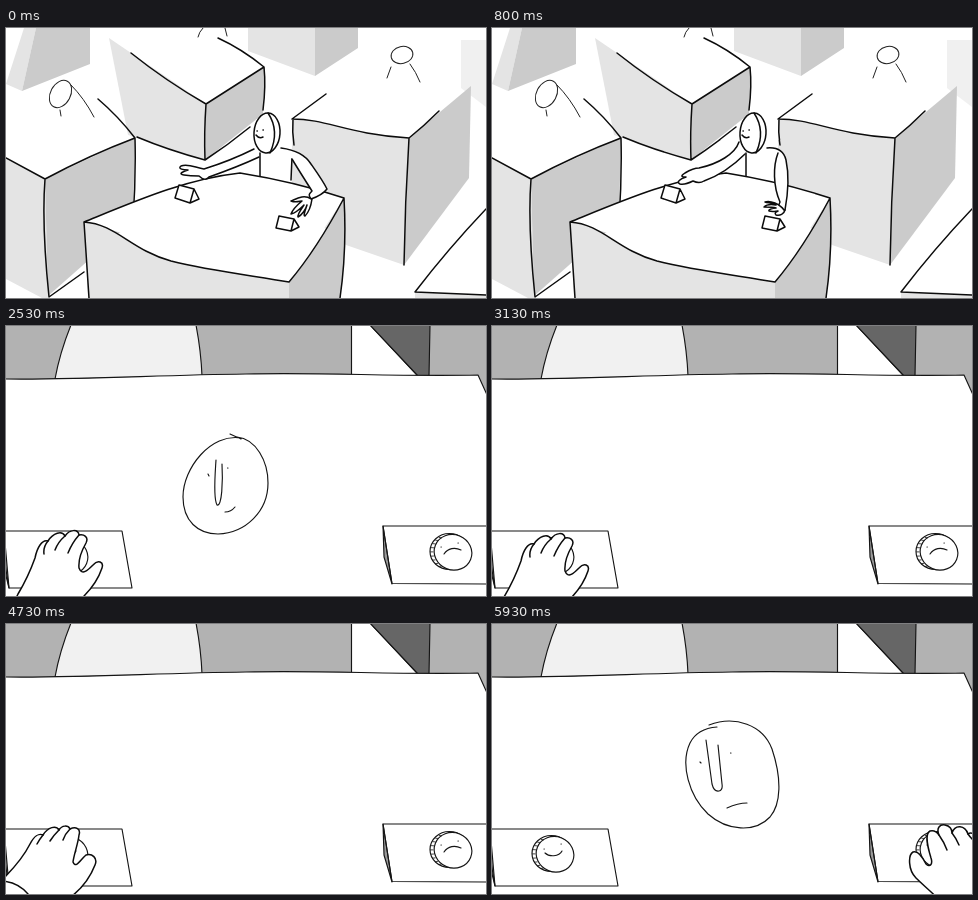
An HTML page for the animation above (5990 ms loop, 480 px wide and 270 px high).

```html
<!DOCTYPE html>
<html lang="en">
<head>
<meta charset="utf-8">
<title>Tables and coins</title>
<style>
html, body { margin: 0; width: 100%; height: 100%; overflow: hidden; background: #fff; }
svg { display: block; width: 100vw; height: 100vh; }
path { stroke-linecap: round; stroke-linejoin: round; }
.light { fill: #e4e4e4; }
.dark { fill: #cbcbcb; }
.ink { fill: none; stroke: #0c0c0c; stroke-width: 1.5; }
.thin { fill: none; stroke: #151515; stroke-width: 1.15; }
.fine { fill: none; stroke: #222; stroke-width: 1; }
.white { fill: #fff; }
</style>
</head>
<body>
<svg viewBox="0 0 480 270" preserveAspectRatio="none">
  <g id="wide">
    <path class="light" d="M18 0H30L16 63L0 56Z M242 0H309V48L242 23Z"/>
    <path class="dark" d="M30 0H84V36L16 63Z M309 0H352V20L309 48Z"/>
    <path fill="#f0f0f0" d="M455 12H480V79L455 60Z"/>

    <path class="light" d="M103 10L200 76L199 132L122 107Z"/>
    <path class="dark" d="M200 76L259 39L257 86L199 132Z"/>
    <path class="ink" d="M125 25Q160 53 200 76Q228 58 258 39Q236 21 212 10 M200 76Q198 105 199 132Q222 117 244 99 M258 39Q260 58 257 82 M131 109Q162 122 199 132"/>

    <path class="light" d="M0 130L39 151L42 270H36L0 251Z"/>
    <path class="dark" d="M39 151L129 109L127 193L42 268Z"/>
    <path class="ink" d="M0 130L39 151Q84 127 129 110Q112 88 92 71 M39 151C36 190 39 230 43 269L78 244 M129 110Q130 150 127 192"/>

    <path class="light" d="M286 91C322 91 340 106 403 110L398 237L340 217L286 174Z"/>
    <path class="dark" d="M403 110L465 58L463 150L398 237Z"/>
    <path class="ink" d="M320 66L286 91C322 91 340 106 403 110Q418 98 433 83 M403 110Q399 174 398 237 M287 91Q286 104 288 117"/>

    <path class="light" d="M409 264L480 267V270H409Z"/>
    <path class="ink" d="M480 181Q442 221 409 264L480 267"/>

    <g class="fine">
      <ellipse cx="54.500" cy="66" rx="10" ry="14.500" transform="rotate(28 54.500 66)"/>
      <ellipse cx="396" cy="27" rx="11" ry="8.500" transform="rotate(-12 396 27)"/>
      <path d="M65 57Q78 70 88 89M54 82L55 88M385 39L381 50M404 36Q410 44 414 54M197 0Q193 4 192 9M219 0L221 8"/>
    </g>

    <path class="white" d="M254 121L276 121L286 128L286 156L254 152Z"/>
    <path class="ink" d="M254 125V148M286 129L285 152"/>
    <path class="white" d="M234 145C180 151 132 172 78 194L283 254L338 170Q290 154 234 145Z"/>
    <path class="light" d="M78 194C110 196 125 222 165 233C205 243 250 248 283 254V270H82Z"/>
    <path class="dark" d="M283 254C305 228 322 200 338 170Q341 222 334 270H283Z"/>
    <path class="ink" d="M234 145C180 151 132 172 78 194C110 196 125 222 165 233C205 243 250 248 283 254C305 228 322 200 338 170Q290 154 234 145M78 194L83 270M338 170Q341 222 334 270"/>

    <path id="armR" class="ink white"/>
    <path id="armL" class="ink white"/>
    <path id="fingers" class="ink white"/>
    <g class="ink">
      <ellipse cx="261" cy="105" rx="13" ry="20" fill="#fff" transform="rotate(4 261 105)"/>
      <path d="M262 85Q274 103 264 125M250 107Q253 111 257 109M251 103H251.3M257 102H257.3"/>
      <path fill="#fff" d="M173 157L169 170L184 175L188 161ZM188 161L193 171L184 175M273 188L270 200L285 203L288 191ZM288 191L293 199L285 203"/>
    </g>
  </g>

  <g id="near">
    <path fill="#b2b2b2" d="M0 0H480V68H0Z"/>
    <path class="thin" style="fill:#f1f1f1" d="M49 53Q54 26 65 -1H190Q195 25 196 50Z"/>
    <path class="thin" style="fill:#fff" d="M345.500 -1H364L412 50H345.500Z"/>
    <path class="thin" style="fill:#666" d="M364 -1H424L423 50H412Z"/>
    <path class="thin" style="fill:#fff" d="M-2 53C80 54 150 49 240 48C320 46 390 51 472 49L482 71V272H-2Z"/>
    <path class="thin" style="fill:#999" d="M-2 205L3 262L-2 242Z M377 200L386 258L378 231Z"/>
    <path class="thin" d="M-2 205H116L126 262H3L-1 238M482 200H377L386 257.500L482 258"/>
    <g id="coins"></g>
    <g id="face" class="thin"><path id="faceLine"/></g>
    <g id="hand"><path id="handFill" class="ink white"/><path id="knuckles" class="ink"/></g>
    <g id="hand2">
      <path class="ink white" d="M482 340L446 275C440 268 432 262 424 254C416 246 416 231 421 228C426 226 430 232 434 240C438 244 441 240 439 234C436 224 432 210 438 207C442 206 445 208 447 211C444 204 448 200 453 201C458 202 460 205 460 209C463 200 473 201 476 210C480 207 487 212 492 222L530 340"/>
      <path class="ink" d="M447 211Q452 218 455 226M460 209Q464 214 467 221M476 210Q478 213 481 216"/>
    </g>
  </g>
</svg>
<script>
const LOOP = 5990, STEP = 1000 / 15, CUT = 16;
const el = id => document.getElementById(id);
const lerp = (a, b, k) => a + (b - a) * k;
const ease = k => k * k * (3 - 2 * k);
const part = (s, a, b) => ease(Math.min(1, Math.max(0, (s - a) / (b - a))));

// Blend two paths that share the same commands.
function mix(a, b, k) {
  const nums = b.match(/-?[\d.]+/g);
  let i = 0;
  return a.replace(/-?[\d.]+/g, n => lerp(+n, +nums[i++], k).toFixed(2));
}

const armL = [
  "M248 121C234 128 214 136 198 141C190 140 182 135 175 138C171 141 178 142 182 142C176 144 172 146 178 147C184 148 188 148 193 148C197 152 201 152 203 149C220 143 238 136 253 129",
  "M247 114C243 126 226 136 207 140C203 140 198 142 193 145C187 149 191 149 194 149C188 151 184 154 188 156C193 157 197 155 201 153C205 155 209 155 212 153C226 148 242 137 253 126"
];
const armR = [
  "M275 120C290 122 300 128 305 136C312 146 317 153 321 161C317 166 311 169 305 171C302 167 303 166 306 163C299 152 292 141 286 131",
  "M275 120C286 119 292 124 294 132C297 146 297 160 293 182C290 183 288 183 286 181C286 178 287 176 288 174C281 158 281 138 286 125"
];
const fingers = [
  "M305 171C298 166 290 171 285 173C290 175 294 173 296 173C290 178 286 183 285 186C290 185 295 180 298 177C294 183 291 187 292 189C296 187 300 181 301 177C299 183 297 188 299 188C303 184 305 178 306 171",
  "M292 182C288 176 278 172 273 174C276 175 281 175 284 177C279 176 274 177 272 179C276 179 281 179 284 180C280 180 276 182 277 183C281 184 284 183 286 183C284 184 282 185 284 187C288 188 292 186 293 182"
];

const hands = [
  "M-22 340L12 268C18 258 24 246 29 232C31 222 36 213 42 215C47 207 56 204 59 210C64 203 72 203 73 209C78 208 83 211 80 217C76 224 72 232 73 242C76 250 82 244 87 239C92 233 98 236 96 242C92 254 86 262 78 270L40 340",
  "M-28 320L3 262C12 252 20 244 27 232C28 224 34 219 39 222C42 214 49 212 53 216C58 210 64 212 66 216C73 213 78 215 77 221C74 228 72 236 73 240C75 246 79 243 82 240C86 235 92 238 89 244C84 254 78 262 72 270L30 340",
  "M-50 320L-4 256C8 244 18 232 24 220C28 212 33 209 37 211C42 203 50 201 53 206C56 201 62 201 64 205C70 202 75 205 73 211C72 220 68 230 67 238C70 245 74 236 80 231C86 229 92 234 89 241C84 254 76 264 66 272L20 340"
];
const knuckles = [
  "M42 215Q37 221 38 228M59 210Q52 216 49 224M73 209Q66 217 62 227M8 274Q14 275 20 279",
  "M39 222Q36 226 35 230M53 216Q48 221 46 226M66 216Q61 221 59 228M3 262Q12 263 18 270",
  "M37 211Q33 216 31 220M53 206Q47 212 44 217M64 205Q59 210 57 216M-4 257Q12 258 22 270"
];
// step, pose, dx, dy
const moves = [
  [25, 0, -55, 95], [29, 0, 0, 0], [31, 0, 0, 0], [34, 0, 8, -35], [38, 0, 0, 0],
  [42, 1, 0, 0], [47, 0, 0, 3], [52, 1, 2, -3], [57, 1, 0, 0], [61, 2, 0, 0],
  [65, 2, 3, -33], [69, 2, 0, 0], [75, 2, 0, 0], [82, 2, -70, 95]
];

const faces = [
  { from: 28, to: 46, at: [219, 160],
    d: "M224 108L235 113M235 112C205 107 177 142 177 171C177 195 192 208 212 208C240 207 262 185 262 157C262 135 250 113 231 111M210 134C209 150 207 172 211 179C216 181 217 155 216 138M202 148L203 150M221.500 142H222M219 186Q225 186 229 181" },
  { from: 54, to: 70, at: [219, 150],
    d: "M213 103C196 108 191 130 191 155C192 180 203 196 222 196C240 196 246 178 246 155C246 128 235 108 219 108C214 108 211 110 209 113M208 123C207 140 209 155 212 163C214 155 214 140 214 131M199 148H199.400M222.500 135H223M217 171Q221 171 225 169" },
  { from: 84, to: 90, at: [240, 150],
    d: "M217 101C243 91 271 101 280 125C290 155 289 180 278 193C263 209 235 207 216 190C197 172 188 140 198 119C203 109 212 104 225 103M214 116L220 160Q222 168 227 167Q231 166 230 160L226 121M208 138L209 139M238.500 129H239M235 184Q246 179 255 179" }
];

function coin(x, y, mood) {
  let ticks = "";
  for (let i = 0; i < 9; i++) {
    const a = Math.PI * (0.69 + i * 0.078), c = Math.cos(a), s = Math.sin(a);
    ticks += `M${62 + 19 * c} ${230 + 17 * s}L${60 + 19.5 * c} ${230 + 17.5 * s}`;
  }
  return `<g class="thin" transform="translate(${x} ${y})">
    <ellipse cx="59.500" cy="229.500" rx="19.500" ry="18" fill="#fff"/>
    <ellipse cx="63" cy="230.300" rx="19" ry="17.600" style="fill:#fff" transform="rotate(22 63 230.300)"/>
    <path stroke-width=".8" style="stroke-width:.8" d="${ticks}"/><path d="${mood}"/></g>`;
}
el("coins").innerHTML =
  coin(0, 0, "M52 225H52.300M69 220H69.300M53 229C57 233 67 233 70 227") +
  coin(384, -4, "M51 225H51.300M68 221H68.300M54 232C58 226 65 225 71 228");

function showHand(s) {
  const on = s > 25 && s < 82;
  el("hand").style.display = on ? "" : "none";
  if (!on) return;
  const i = moves.findIndex(m => m[0] > s), a = moves[i - 1], b = moves[i];
  const k = part(s, a[0], b[0]);
  el("handFill").setAttribute("d", mix(hands[a[1]], hands[b[1]], k));
  el("knuckles").setAttribute("d", mix(knuckles[a[1]], knuckles[b[1]], k));
  el("hand").setAttribute("transform", `translate(${lerp(a[2], b[2], k)} ${lerp(a[3], b[3], k)})`);
}

function showFace(s) {
  const f = faces.find(f => s >= f.from && s <= f.to);
  el("face").style.display = f ? "" : "none";
  if (!f) return;
  const [x, y] = f.at;
  let size = lerp(0.55, 1, part(s, f.from - 1, f.from + 3)), lift = 0;
  if (f === faces[1]) {
    const k = part(s, 57, 60);
    size *= lerp(1, 1.2, k);
    lift = -8 * k;
  }
  if (s === f.to) size *= 0.6;
  el("faceLine").setAttribute("d", f.d);
  el("face").setAttribute("transform",
    `translate(${x} ${y + lift}) scale(${size}) translate(${-x} ${-y})`);
}

function draw(ms) {
  const s = Math.min(89, Math.floor((ms % LOOP + 4) / STEP));
  const wide = s < CUT;
  el("wide").style.display = wide ? "" : "none";
  el("near").style.display = wide ? "none" : "";
  if (wide) {
    const k = part(s, 0, 12);
    el("armL").setAttribute("d", mix(armL[0], armL[1], k));
    el("armR").setAttribute("d", mix(armR[0], armR[1], k));
    el("fingers").setAttribute("d", mix(fingers[0], fingers[1], k));
    return;
  }
  showHand(s);
  showFace(s);
  const k = 1 - part(s, 81, 86);
  el("hand2").style.display = s > 81 ? "" : "none";
  el("hand2").setAttribute("transform", `translate(${60 * k} ${85 * k})`);
}

const start = performance.now();
function tick() {
  draw(performance.now() - start);
  requestAnimationFrame(tick);
}
tick();
</script>
</body>
</html>
```
